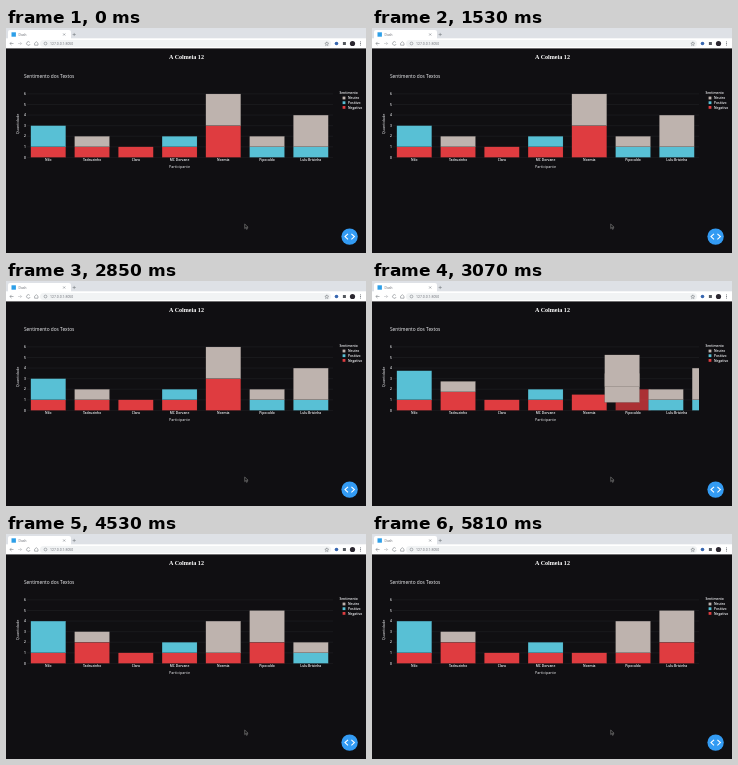
An HTML page that plays this animation: 360 px wide and 225 px high, repeating every 5.84 s.

```html
<!DOCTYPE html>
<html lang="pt">
<head>
<meta charset="utf-8">
<style>
  html, body { margin: 0; width: 100%; height: 100%; overflow: hidden; background: #100f12; }
  svg { display: block; width: 100vw; height: 100vh; }
  text { font-family: "Open Sans", sans-serif; fill: #f4f5f8; }
  .title { font: bold 6.1px "Liberation Serif", serif; fill: #fff; }
  .tick { font-size: 3.3px; font-weight: 600; }
  .axis { font-size: 3.75px; font-weight: 500; }
  .chrome { font: 3.5px Roboto, sans-serif; fill: #777a80; }
  .mid { text-anchor: middle; }
  .end { text-anchor: end; }
  .icon { fill: none; stroke: #7d8186; stroke-width: .6; }
</style>
</head>
<body>
<svg viewBox="0 0 360 225" preserveAspectRatio="none">
  <defs><clipPath id="plot"><rect x="20" y="60" width="307" height="70"/></clipPath></defs>
  <rect width="360" height="225" fill="#100f12"/>

  <g id="browser">
    <rect width="360" height="11" fill="#dee1e6"/>
    <path d="M2 11V4Q2 2 4 2H63Q65 2 65 4V11Z" fill="#fff"/>
    <rect y="10.3" width="360" height="10.1" fill="#fff"/>
    <rect x="5.5" y="4.3" width="4.4" height="4.4" fill="#2d9fe8"/>
    <text class="chrome" x="12.6" y="7.8">Dash</text>
    <path class="icon" d="M57.2 5.5l2 2m0-2l-2 2M66.6 6.5h3.2m-1.6-1.6v3.2"/>
    <rect x="34" y="12" width="291" height="7" rx="3.5" fill="#f1f3f4"/>
    <path class="icon" d="M7.5 15.5h-3.6m1.6-1.6l-1.6 1.6l1.6 1.6M23.8 14.4a1.8 1.8 0 1 0 .3 1.6M28.6 17.2v-2l1.7-1.5 1.7 1.5v2Z"/>
    <path class="icon" opacity=".5" d="M12 15.5h3.6m-1.6-1.6l1.6 1.6l-1.6 1.6"/>
    <circle class="icon" cx="39.5" cy="15.5" r="1.4"/>
    <text class="chrome" x="44" y="16.8">127.0.0.1:8050</text>
    <path class="icon" d="M320.8 13.8l.5 1.2 1.4.1-1 1 .3 1.4-1.2-.7-1.2.7.3-1.4-1-1 1.4-.1Z"/>
    <circle cx="330.5" cy="15.5" r="1.8" fill="#3867b0"/>
    <rect x="336.9" y="14" width="3" height="3" fill="#55595f"/>
    <circle cx="346.5" cy="15.5" r="2.6" fill="#2b2730"/>
    <path d="M354.5 13.5v4" stroke="#666a70" stroke-dasharray=".8 .8"/>
  </g>

  <text class="title mid" x="180.5" y="31">A Colmeia 12</text>
  <text x="18" y="49.6" font-size="4.75">Sentimento dos Textos</text>
  <g id="grid"></g>
  <g id="bars" clip-path="url(#plot)"></g>
  <g id="labels"></g>
  <text class="axis mid" x="173.5" y="140.2">Participante</text>
  <text class="axis mid" transform="translate(13 96) rotate(-90)">Quantidade</text>
  <text class="tick" x="333.4" y="66.2">Sentimento</text>
  <g id="legend"></g>

  <path d="M238.7 196v4.6l1.1-1 .8 1.8.8-.4-.8-1.7h1.5Z" fill="#111" stroke="#bbb" stroke-width=".4"/>
  <circle cx="343.6" cy="208.6" r="8.2" fill="#339bf3"/>
  <path d="M342 205.8l-3 2.8 3 2.8m3.4-5.6l3 2.8-3 2.8" fill="none" stroke="#fff" stroke-width="1.1"/>
</svg>
<script>
const LOOP = 5840, BASE = 129.4, UNIT = 10.58, LEFT = 24.8, PITCH = 43.75, WIDTH = 35;
const NAMES = ['Nilo', 'Tadeuzinho', 'Clara', 'MC Dorvane', 'Noemia', 'Pipocaldo', 'Lulu Brisinha'];
const KINDS = [
  { key: 'r', name: 'Negativo', color: '#df3c40' },
  { key: 'b', name: 'Positivo', color: '#58c0d5' },
  { key: 'n', name: 'Neutro', color: '#beb3ae' }
];

// One letter per unit, stacked upwards; the eighth column lies outside the plot.
const STATES = [
  'rbb rn r rb rrrnnn bn bnnn nn',
  'rbbb rrn r rb rnnn rrnnn bn bnnn',
  'rbbb rrn r rb r rnnn rrnnn bn'
].map(state => state.split(' '));
const SLOTS = 8, INSERT = 4;
const FIRST_MOVE = 2768, MOVE_GAP = 1890, DURATION = 500;
const BURST = 670, BURST_START = 2520, STEP = 68.7, STEPS = 8;

const clamp = v => Math.min(1, Math.max(0, v));
const ease = t => t < .5 ? 4 * t ** 3 : 1 - 4 * (1 - t) ** 3;

function add(parent, tag, attrs, text = '') {
  const el = document.createElementNS('http://www.w3.org/2000/svg', tag);
  for (const key in attrs) el.setAttribute(key, attrs[key]);
  el.textContent = text;
  document.getElementById(parent).append(el);
  return el;
}

for (let v = 0; v <= 6; v++) {
  const y = BASE - v * UNIT;
  add('grid', 'path', { d: `M21 ${y}H327`, stroke: '#232227', 'stroke-width': .5 });
  add('labels', 'text', { class: 'tick end', x: 20, y: y + 1.1 }, v);
}
NAMES.forEach((name, i) =>
  add('labels', 'text', { class: 'tick mid', x: LEFT + PITCH * i + WIDTH / 2, y: 133.3 }, name));
[...KINDS].reverse().forEach(({ name, color }, i) => {
  const y = 70 + i * 4.7;
  add('legend', 'rect', { x: 336.6, y: y - 1.4, width: 2.8, height: 2.8, fill: color });
  add('legend', 'text', { class: 'tick', x: 342, y: y + 1.1 }, name);
});

const bars = KINDS.flatMap(({ key, color }) => Array.from({ length: SLOTS }, (_, slot) => ({
  key, slot,
  el: add('bars', 'rect', { width: WIDTH, fill: color, stroke: '#100f12', 'stroke-width': .25, 'stroke-opacity': .6 })
})));

// Red bars keep their column; the others make room for the column put in at INSERT.
function sourceSlot(key, slot) {
  if (key === 'r' || slot < INSERT) return slot;
  return slot === INSERT ? SLOTS - 1 : slot - 1;
}

function segment(state, slot, key) {
  const stack = state[slot];
  return { slot, base: stack.indexOf(key), height: stack.split(key).length - 1 };
}

// The screen refreshes in bursts of even steps with a short rest after each.
function refreshTime(time) {
  const start = BURST_START + BURST * Math.floor((time - BURST_START) / BURST);
  return start + STEP * Math.min(STEPS, Math.floor((time - start) / STEP));
}

function draw(now) {
  const shown = refreshTime(now % LOOP);
  const move = shown < FIRST_MOVE + MOVE_GAP ? 0 : 1;
  const p = ease(clamp((shown - FIRST_MOVE - MOVE_GAP * move) / DURATION));
  for (const { key, slot, el } of bars) {
    const to = segment(STATES[move + 1], slot, key);
    const old = segment(STATES[move], sourceSlot(key, slot), key);
    const from = old.height ? old : to;
    const mix = prop => from[prop] + (to[prop] - from[prop]) * p;
    el.style.opacity = !to.height ? 0 : old.height ? 1 : p;
    el.setAttribute('x', LEFT + PITCH * mix('slot'));
    el.setAttribute('y', BASE - UNIT * (mix('base') + mix('height')));
    el.setAttribute('height', UNIT * mix('height'));
  }
}

const origin = performance.now();
function frame() {
  draw(performance.now() - origin);
  requestAnimationFrame(frame);
}
frame();
</script>
</body>
</html>
```
